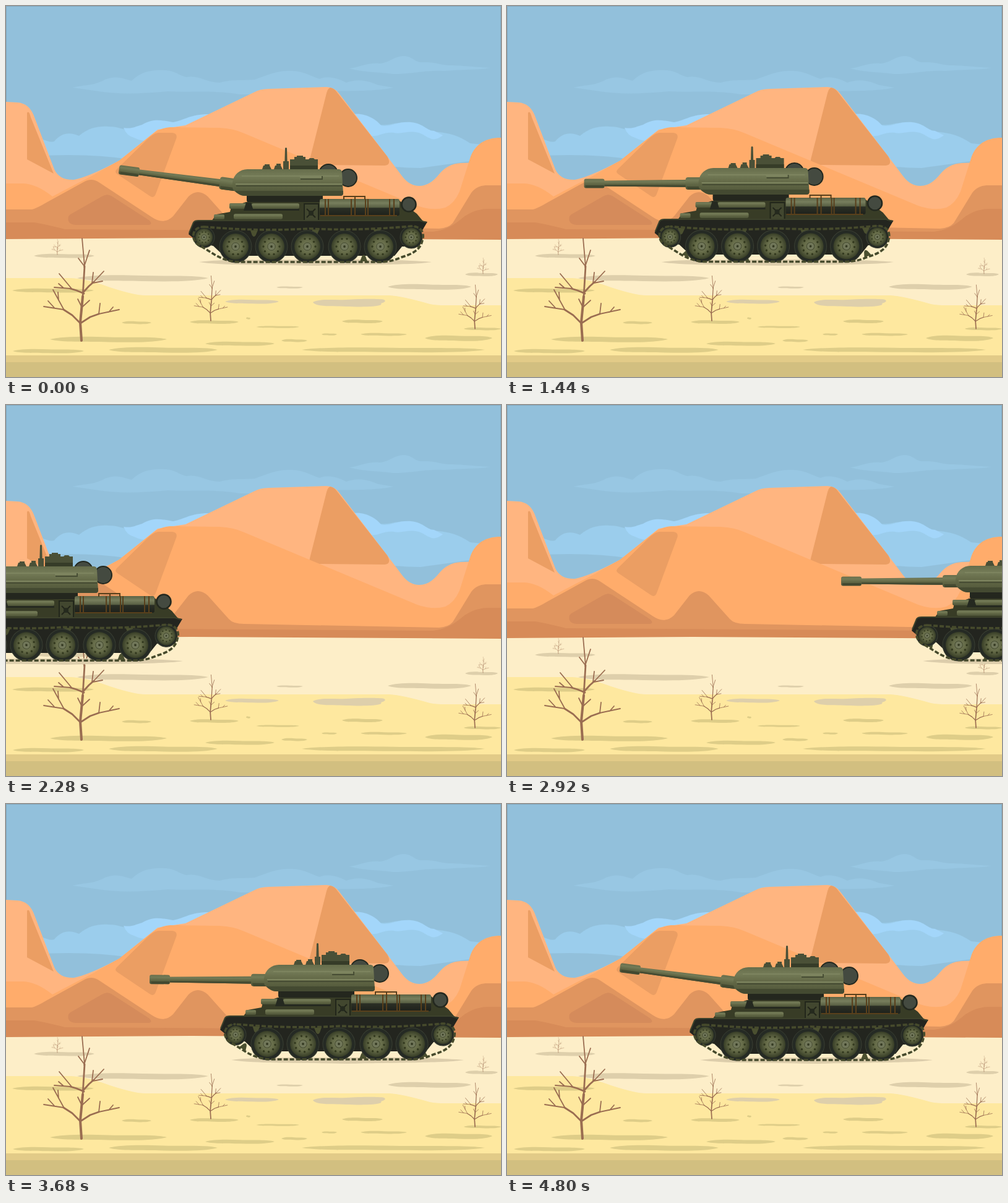
Animation of 800x600 px, one loop 4.84 s. Source, as an HTML page:

```html
<!DOCTYPE html>
<html>
<head>
<meta charset="utf-8">
<title>Desert tank</title>
<style>
html, body { margin: 0; width: 100%; height: 100%; overflow: hidden; background: #92c0db; }
svg { display: block; width: 100vw; height: 100vh; }
</style>
</head>
<body>
<svg viewBox="0 0 800 600" preserveAspectRatio="none">
<defs>
  <linearGradient id="steel" x2="0" y2="1">
    <stop offset="0" stop-color="#666d4b"/><stop offset=".25" stop-color="#747b57"/>
    <stop offset=".55" stop-color="#626846"/><stop offset="1" stop-color="#4d5337"/>
  </linearGradient>
  <linearGradient id="deck" x2="0" y2="1">
    <stop offset="0" stop-color="#5c6345"/><stop offset=".25" stop-color="#777e5d"/>
    <stop offset=".5" stop-color="#596044"/><stop offset=".55" stop-color="#2b2f25"/>
    <stop offset="1" stop-color="#1e211b"/>
  </linearGradient>
  <radialGradient id="rim">
    <stop offset="0" stop-color="#7b815f"/><stop offset=".55" stop-color="#626845"/>
    <stop offset="1" stop-color="#383e27"/>
  </radialGradient>
  <g id="bush" fill="none" stroke="#9a6d51" stroke-linecap="round" stroke-linejoin="round">
    <path d="M0 0L-2-29L2-71" stroke-width="4"/>
    <path d="M2-71L5-120M-2-28L-15-41L-29-50M0-29L14-38L28-43M2-77L12-88L20-95M4-76L-8-81L-18-84" stroke-width="2.8"/>
    <path d="M5-120L1-165M-29-50L-61-55M-28-49L-46-82M28-43L61-50M28-43L30-60M44-46L51-54M20-95L36-112M17-93L19-110M18-93L34-96M-18-84L-44-86M-16-84L-36-108M-29-85L-37-92M4-121L-5-133M4-119L13-146M1-54L13-65M-43-52L-54-64M-37-65L-38-78M0-55L-6-67" stroke-width="1.8"/>
  </g>
</defs>

<path fill="#92c0db" d="M0 0H800V600H0Z"/>
<path fill="#98c7e3" d="M108 132C125 127 140 130 160 119C178 112 188 117 203 121C220 104 240 103 256 104C273 104 280 113 292 115C310 111 325 124 345 124C365 118 385 121 402 119C424 111 440 104 458 105C478 104 490 112 507 118C520 112 536 117 550 124C570 116 588 122 602 128L626 132C600 138 560 137 520 138C460 136 420 144 378 143C335 136 300 140 262 138C220 142 180 143 150 138Z"/>
<path fill="#98c7e3" d="M555 101C575 98 583 91 604 93C620 92 625 82 642 81C658 81 660 92 674 91C695 90 700 96 722 96C745 97 760 99 783 100C760 104 735 102 708 105C680 103 655 110 625 110C600 106 580 108 555 101Z"/>
<path fill="#9bcdec" d="M40 214C65 214 68 222 78 219C90 204 104 204 118 210C135 196 150 194 166 195C187 195 195 205 220 201L380 190L590 185C606 198 620 190 635 189C655 185 670 195 690 203C718 205 732 210 750 222L800 227V248Q760 249 735 253L670 262Q620 262 560 250L200 248Q130 237 40 243Z"/>
<path fill="#a3d6fa" d="M190 197C205 199 208 195 220 192C240 180 255 186 270 188C290 184 300 174 330 175H560C580 172 598 183 606 193C620 197 632 186 655 188C675 190 680 202 692 202L706 209C690 222 683 212 672 207C655 199 640 208 627 205C610 203 602 212 590 210H250C235 224 215 217 207 213Q195 210 190 197Z"/>

<path fill="#ffb580" d="M0 155L18 156Q38 157 46 180L78 264Q86 282 110 281Q135 276 183 250L245 200L290 193L400 140Q410 134 425 134L518 131Q530 131 538 141L616 243L640 275Q652 291 668 291Q685 291 700 272Q714 255 735 254L765 253V380H0Z"/>
<path fill="#eb9e63" d="M34 173Q37 168 40 180L77 271L34 248Z"/>
<path fill="#eb9e63" d="M524 132Q531 133 536 141L616 243Q624 257 612 258L496 257Q489 256 491 248L518 141Q520 133 524 132Z"/>
<path fill="#ffac6b" d="M0 287H28Q50 288 75 308L140 274L183 250L237 207Q250 197 265 196L345 197Q368 198 385 206L490 250L655 319Q685 333 710 326Q725 319 733 300L751 243Q762 215 795 213H800V380H0Z"/>
<path fill="#eb9e63" d="M246 205H269Q278 206 275 215L242 304Q239 312 232 307L180 272Q174 268 180 263L228 216Q238 206 246 205Z"/>
<path fill="#e0955f" d="M0 329H42Q50 327 65 318L125 285Q138 277 150 285L235 341Q255 355 270 340L295 308Q310 294 326 308L360 346Q367 354 385 354L700 360Q715 359 722 351L752 302Q760 291 775 290H800V378H0Z"/>
<path fill="#d58b5b" d="M104 337L155 308Q163 303 170 307L232 347Q238 354 229 354H112Q98 353 101 340Z"/>
<path fill="#d78b58" d="M0 350H45Q60 352 95 361L400 363L690 365Q715 362 735 345Q755 328 780 328H800V379H0Z"/>

<path fill="#fdeec8" d="M0 377L300 375L800 378V490H0Z"/>
<path fill="#fee89f" d="M0 440H105Q130 441 168 455Q208 468 225 468H620Q640 469 685 482Q695 484 710 484H800V566H0Z"/>
<path fill="#e2cb88" d="M0 565H800V577H0Z"/>
<path fill="#d2bf80" d="M0 576H800V600H0Z"/>
<g id="patches"></g>
<use href="#bush" transform="translate(122 541)"/>
<use href="#bush" transform="translate(331 509) scale(.44)"/>
<use href="#bush" transform="translate(758 522) scale(.43)"/>
<use href="#bush" transform="translate(83 402) scale(.15)"/>
<use href="#bush" transform="translate(771 433) scale(.155)"/>

<path id="shade" fill="#dccdab" d="M312 414C350 409 410 411 500 410C590 409 650 411 688 414C660 419 570 418 500 420C420 418 350 420 312 414Z"/>
<g id="tank">
  <g id="body">
    <g id="turret">
      <g fill="#444a40" stroke="#23281f" stroke-width="2">
        <circle cx="521" cy="271" r="15"/><circle cx="553" cy="278" r="14"/>
      </g>
      <path fill="#24271e" d="M389 304H512V320H395Q389 318 389 314Z"/>
      <g fill="#4a5037">
        <path d="M451 230Q452.500 228 454 230L455 264H450Z"/>
        <path d="M459 248H466V244H470V242H480V244H484V248H489L491 246H497L499 248H504V265H459Z"/>
        <path d="M414 264L416 258H418V256H426V258L429 264Z"/>
        <path d="M433 264L435 258H437V255H444V258L447 264Z"/>
        <path d="M448 251H457V264H448Z"/>
      </g>
      <path fill="#363c28" d="M459 258H504V264H459Z"/>
      <g id="gun">
        <path fill="url(#steel)" d="M212 284.500L347 283V295L212 293.500Z"/>
        <path fill="#454b32" d="M212 291L347 291.500V295L212 293.500Z"/>
        <rect x="181" y="281.500" width="33" height="15" rx="3" fill="url(#steel)"/>
        <path fill="#434930" d="M183 292H213V296H184Z"/>
        <rect x="345" y="279" width="28" height="20" rx="4" fill="url(#steel)"/>
        <path fill="#434930" d="M347 294H371V299H349Z"/>
      </g>
      <path fill="url(#steel)" d="M366 286Q367 276 374 270Q381 264 390 264H538Q543 264 543 270L545 303Q545 307 540 307H385Q376 306 369 299Q365 296 366 286Z"/>
      <path fill="#444a31" d="M370 299H545V303Q545 307 540 307H385Q377 306 370 299Z"/>
      <path fill="none" stroke="#7d845f" stroke-width="2" d="M381 275H538M371 288H543"/>
      <path fill="none" stroke="#474d34" stroke-width="2" d="M372 291H543M476 280H511V275"/>
      <path fill="none" stroke="#7d845f" stroke-width="2" d="M475 277H510"/>
    </g>
    <path fill="#383c26" d="M332 348L340 337L362 333L364 325L388 317H512L632 312L664 336L674 348Z"/>
    <g fill="url(#steel)">
      <rect x="361" y="319" width="28" height="9" rx="2"/>
      <rect x="397" y="319" width="77" height="9" rx="3"/>
      <rect x="336" y="337" width="17" height="8" rx="2"/>
      <rect x="368" y="336" width="79" height="9" rx="3"/>
    </g>
    <path fill="#252920" d="M388 318H396L400 331H384ZM397 328H474V331H397Z"/>
    <path fill="#42472f" d="M482 320H505V347H482Z"/>
    <path fill="none" stroke="#22261b" stroke-width="2" d="M482 320H505V347H482ZM486 328L500 342M500 328L486 342"/>
    <circle cx="493" cy="335" r="4" fill="#252a1e"/>
    <circle cx="651" cy="321" r="11.500" fill="#444a40" stroke="#23281f" stroke-width="2.500"/>
    <rect x="507" y="312" width="129" height="27" rx="3" fill="url(#deck)"/>
    <path fill="none" stroke="#59401c" stroke-width="2" d="M508 339H632M516 312V339M521 312V339M558 312V339M564 309V339M581 312V339M585 312V339M620 312V339M627 312V339M546 313V308H580V313"/>
    <path fill="#23251f" d="M295 369L302 351Q304 347 310 347H670L681 349L671 366L660 389H640L628 404H352L335 388L312 383Z"/>
    <path fill="none" stroke="#3d422c" stroke-width="2" d="M296 367L303 350Q305 347 311 347H669L679 350"/>
  </g>
  <g id="teeth" fill="#4b5030"></g>
  <g id="wheels"></g>
  <path id="track" fill="none" stroke="#464a2c" stroke-width="3.600" stroke-dasharray="7 3" d="M320 357Q410 365 490 360Q570 364 655 356C671 356 677 367 673 379C670 394 657 401 640 406Q622 414 604 414H376Q355 413 337 402L308 384C298 374 302 357 320 357Z"/>
</g>
<path fill="none" stroke="#7d9fb3" stroke-width="1" opacity=".7" d="M.500 155V.500H799.500V213"/>
</svg>
<script>
const NS = 'http://www.w3.org/2000/svg', LOOP = 4840;
const $ = id => document.getElementById(id);
function add(parent, tag, attrs) {
  const el = document.createElementNS(NS, tag);
  for (const k in attrs) el.setAttribute(k, attrs[k]);
  return parent.appendChild(el);
}

// Ground patches: left, right, y, thickness
function patch([a, b, y, h], fill) {
  const w = b - a, u = y - h * .6, v = y + h * .65;
  add($('patches'), 'path', { fill, d:
    `M${a} ${y}C${a + w * .1} ${u} ${a + w * .3} ${u} ${a + w * .5} ${u + h * .15}` +
    `S${a + w * .9} ${u} ${b} ${y}C${a + w * .9} ${v} ${a + w * .7} ${v} ${a + w * .5} ${v - h * .1}` +
    `S${a + w * .1} ${v} ${a} ${y}Z` });
}
[[45, 143, 404, 6], [115, 327, 440, 9], [437, 480, 455, 3], [617, 752, 454, 8],
 [354, 441, 478, 6], [742, 795, 434, 5]].forEach(p => patch(p, '#decfab'));
add($('patches'), 'path', { fill: '#decfab',
  d: 'M496 479C505 473 530 476 550 475S600 473 611 475Q616 478 606 481C612 487 570 487 550 486S500 487 496 479Z' });
[[10, 142, 460, 6], [187, 235, 512, 4], [297, 376, 511, 5], [404, 474, 519, 3], [388, 395, 505, 3],
 [543, 609, 510, 5], [510, 535, 531, 3], [573, 648, 531, 4], [71, 260, 539, 8], [11, 126, 558, 6],
 [166, 342, 556, 8], [322, 434, 546, 6], [445, 487, 541, 4], [478, 774, 556, 7], [677, 786, 537, 8],
 [740, 800, 522, 4]].forEach(p => patch(p, '#decd88'));

function wheel(x, y, r, rim) {
  const g = add($('wheels'), 'g', {});
  add(g, 'circle', { r, fill: '#252a24', stroke: '#3a3f33', 'stroke-width': 1 });
  add(g, 'circle', { r: rim, fill: 'url(#rim)' });
  for (let i = 0; i < 10; i++) {
    const a = i * Math.PI / 5;
    add(g, 'circle', { cx: Math.cos(a) * rim * .62, cy: Math.sin(a) * rim * .62, r: rim * .08, fill: '#33391f' });
  }
  add(g, 'circle', { r: rim * .3, fill: '#71775a', stroke: '#454b30', 'stroke-width': 1 });
  add(g, 'circle', { r: rim * .09, fill: '#363b24' });
  return { g, x, y, r };
}
const wheels = [371, 429, 487, 547, 605].map(x => wheel(x, 389, 26, 21));
wheels.push(wheel(320, 374, 17, 14), wheel(655, 374, 18, 15));

const track = $('track'), len = track.getTotalLength(), TEETH = 8;
const teeth = Array.from({ length: TEETH }, () => add($('teeth'), 'path', { d: 'M-6 1H6L3 9Q0 14-3 9Z' }));

const clamp = u => Math.min(1, Math.max(0, u));
const smooth = u => (u = clamp(u), u * u * (3 - 2 * u));
// Piecewise eased value through [time, value] pairs
function keys(t, list) {
  let i = 1;
  while (i < list.length - 1 && t > list[i][0]) i++;
  const [a, p] = list[i - 1], [b, q] = list[i];
  return p + (q - p) * smooth((t - a) / (b - a));
}
const SWAP = 2700;
function drive(t) {
  if (t < SWAP) return -402 * Math.max(0, (t - 848) / 1432) ** 2.1;
  const early = Math.max(0, (2920 - t) / 220);
  return 360 * Math.max(0, (4710 - t) / 1790) ** 3.5 + 75 * early * early;
}

function draw(t) {
  const x = drive(t);
  const lag = t < SWAP ? keys(t, [[200, 0], [960, 7], [1880, 6], [SWAP, 6]])
                       : keys(t, [[SWAP, -1], [3680, -1], [4800, 0]]);
  const lift = keys(t, [[0, 0], [960, -1.5], [1880, -2.5], [2280, -3], [2900, -4], [3680, -4], [4800, 0]]);
  const aim = 7.5 * (1 - smooth(t / 1420) + smooth((t - 3500) / 1300));
  $('shade').setAttribute('transform', `translate(${x} 0)`);
  $('tank').setAttribute('transform', `translate(${x + lag} ${lift * .25})`);
  $('body').setAttribute('transform', `translate(0 ${lift * .75})`);
  $('gun').setAttribute('transform', `rotate(${aim} 368 289)`);
  for (const w of wheels)
    w.g.setAttribute('transform', `translate(${w.x} ${w.y}) rotate(${x / w.r * 180 / Math.PI})`);
  track.setAttribute('stroke-dashoffset', -x);
  teeth.forEach((el, i) => {
    const s = (((81 + i * len / TEETH + x) % len) + len) % len;
    const p = track.getPointAtLength(s), q = track.getPointAtLength((s + 1) % len);
    const a = Math.atan2(q.y - p.y, q.x - p.x) * 180 / Math.PI;
    el.setAttribute('transform', `translate(${p.x} ${p.y}) rotate(${a})`);
  });
}

const start = performance.now();
function tick() {
  const t = (performance.now() - start) % LOOP;
  draw(Math.floor(t / 40) * 40);
  requestAnimationFrame(tick);
}
tick();
</script>
</body>
</html>
```
